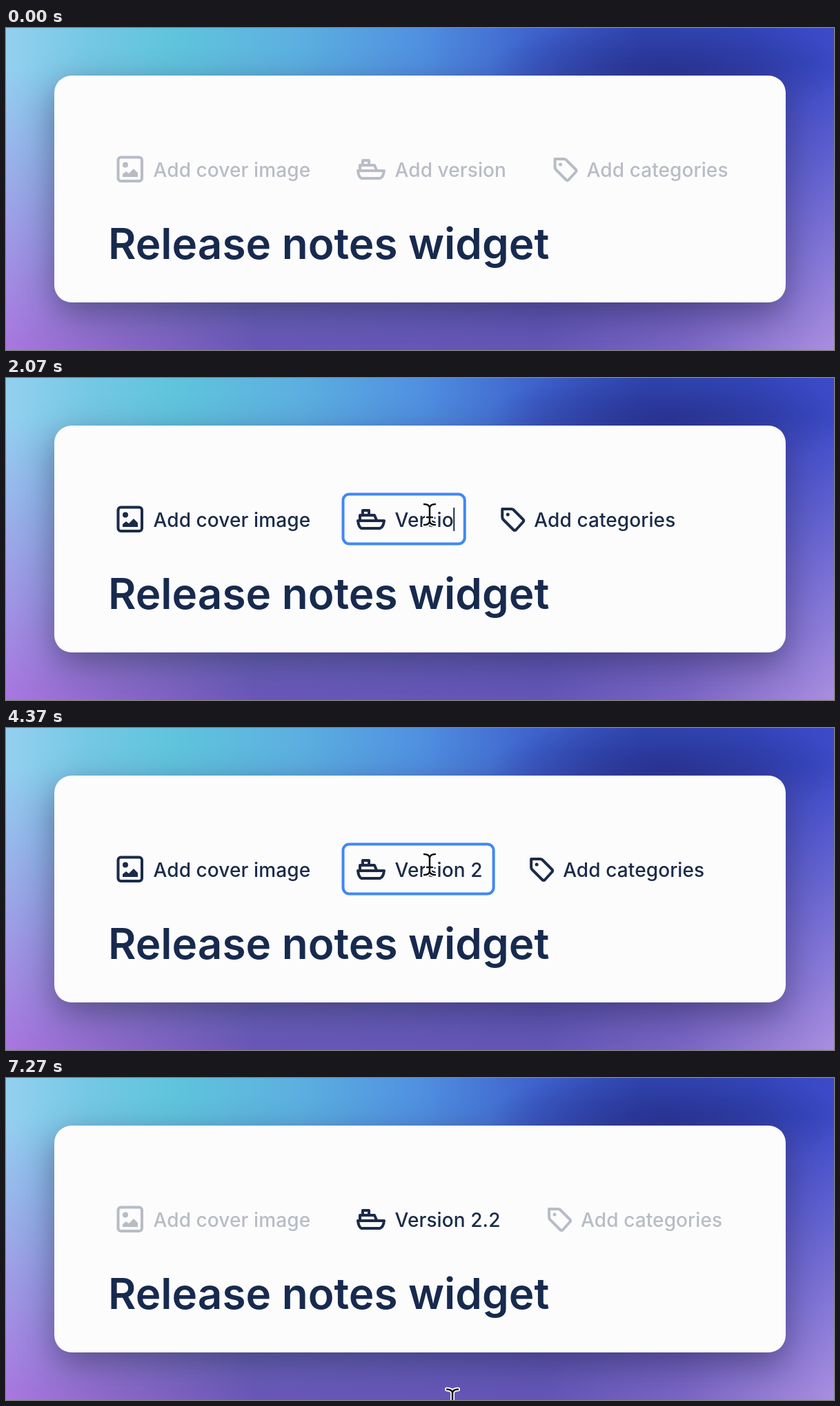
These frames come from a looping animation (1200 px wide and 467 px high, 7.31 s). An HTML page:

```html
<!DOCTYPE html>
<html lang="en">
<head>
<meta charset="utf-8">
<title>Release notes widget</title>
<style>
html, body { margin: 0; width: 100%; height: 100%; overflow: hidden; }
body { position: relative; background: linear-gradient(90deg, #a878e0, #8a68c8 14%, #6a58b8 30%, #6456b6 65%, #7a66c4 82%, #a88ee0); }
#sky, #card, svg { position: absolute; left: 0; top: 0; width: 1200px; height: 467px; }
#sky {
  background:
    radial-gradient(260px 80px at 960px 60px, #2a3494, #2a349400),
    linear-gradient(90deg, #94d0f0, #74c8e4 10%, #60c4dc 20%, #5cb0e0 35%, #5090e0 50%, #3e62cc 64%, #3048b4 77%, #3446bc 90%, #3c4ac8);
  -webkit-mask-image: linear-gradient(#000 12%, #0000 98%);
  mask-image: linear-gradient(#000 12%, #0000 98%);
}
#card { left: 70px; top: 69px; width: 1060px; height: 329px; border-radius: 25px; background: #fcfcfd; box-shadow: 0 16px 48px #2c244c80; }
svg { font: 500 28px Inter, sans-serif; font-optical-sizing: none; letter-spacing: 0.1px; color: #1b2b48; fill: currentColor; }
text { white-space: pre; }
.line { fill: none; stroke: currentColor; stroke-width: 4; stroke-linejoin: round; stroke-linecap: round; }
.title { font-size: 62px; font-weight: 600; letter-spacing: 0; fill: #172a4e; }
</style>
</head>
<body>
<div id="sky"></div>
<div id="card"></div>
<svg viewBox="0 0 1200 467">
  <g id="cover">
    <rect class="line" x="162.5" y="187.5" width="34.5" height="34.5" rx="4"/>
    <circle cx="173" cy="198.5" r="4"/>
    <path d="M169 216v-4l5-4 4 3 7-7 6 6v6z"/>
    <text x="213.5" y="215.5">Add cover image</text>
  </g>
  <rect id="box" x="488.5" y="168.5" height="72" rx="9" fill="#fcfcfd" stroke="#4088f5" stroke-width="4"/>
  <g id="ship" class="line">
    <path d="M510 207h38q-1 9-6 11h-27q-4-2-5-11zM513 206v-7h21l3 7M517 198v-6h9v6"/>
  </g>
  <text id="version" x="563.5" y="215.5"></text>
  <rect id="caret" y="188" width="2" height="34"/>
  <g id="tag">
    <path class="line" d="M-46 190h13q2 0 3 1l14 14q2 2 0 4l-10 11q-2 2-4 0l-14-14q-2-2-2-4z"/>
    <circle cx="-38" cy="198" r="2.5"/>
    <text x="0" y="215.5">Add categories</text>
  </g>
  <text class="title" x="148" y="335">Release notes widget</text>
  <g id="pointer">
    <g id="beam" fill="none" stroke-linecap="round">
      <path id="bar" d="M-8-15q7 0 8 5q1-5 8-5M0-10v20M-8 15q7 0 8-5q1 5 8 5M-4 4h8"/>
    </g>
    <path id="arrow" d="M0-1v30l6.500-5.500 5 12 5-2-5-12h9z" fill="#111" stroke="#fff" stroke-width="2"/>
  </g>
</svg>
<script>
const LOOP = 7310, FOCUS = 1000, BLUR = 6850, FAINT = 0.3;
const el = id => document.getElementById(id);
const TYPED = "Version 2.2";
const KEYS = [1500, 1610, 1730, 1840, 1950, 2070, 2190, 2350, 2800, 4750, 5000];
const PATH = [[0, 652, 490], [150, 650, 480], [800, 614, 198], [6250, 614, 198], [6600, 619, 282], [7270, 647, 466], [LOOP, 649, 490]];
const clamp = v => Math.max(0, Math.min(1, v));

// The text cursor is a dark line over a wider white one.
const bar = el("bar"), halo = bar.cloneNode();
halo.removeAttribute("id");
halo.setAttribute("style", "stroke: #fff; stroke-width: 6px");
bar.setAttribute("style", "stroke: #111; stroke-width: 2.5px");
bar.before(halo);

function pointerAt(t) {
  const i = PATH.findIndex(p => p[0] > t);
  const [a, b] = [PATH[i - 1], PATH[i]];
  let k = (t - a[0]) / (b[0] - a[0]);
  if (i === 2) k = k * k * (3 - 2 * k);
  return [a[1] + (b[1] - a[1]) * k, a[2] + (b[2] - a[2]) * k];
}

function show(id, on) { el(id).style.display = on ? "" : "none"; }

function draw(t) {
  const [x, y] = pointerAt(t);
  const onGap = y > 241 && y < 292;
  el("pointer").setAttribute("transform", `translate(${x} ${y})`);
  show("beam", !onGap);
  show("arrow", onGap);

  const hover = clamp((t - 350) / 150) * clamp((7180 - t) / 150);
  const dim = FAINT + (1 - FAINT) * hover;
  const count = KEYS.filter(k => k <= t).length;
  const focused = t >= FOCUS && t < BLUR;
  const version = el("version");
  version.textContent = count ? TYPED.slice(0, count) : "Add version";
  version.style.opacity = count ? 1 : focused ? FAINT : dim;
  el("cover").style.opacity = el("tag").style.opacity = dim;
  el("ship").style.opacity = count ? 1 : dim;

  const width = version.getComputedTextLength();
  const right = 563.5 + width + 18;
  el("box").setAttribute("width", right - 490.5);
  el("tag").setAttribute("transform", `translate(${right + 98.5} 0)`);
  el("caret").setAttribute("x", 563 + (count ? width : 0));
  const since = t - (count ? KEYS[count - 1] : FOCUS);
  show("box", focused);
  show("caret", focused && since % 1000 < 500);
}

function tick() {
  draw(performance.now() % LOOP);
  requestAnimationFrame(tick);
}
tick();
</script>
</body>
</html>
```
